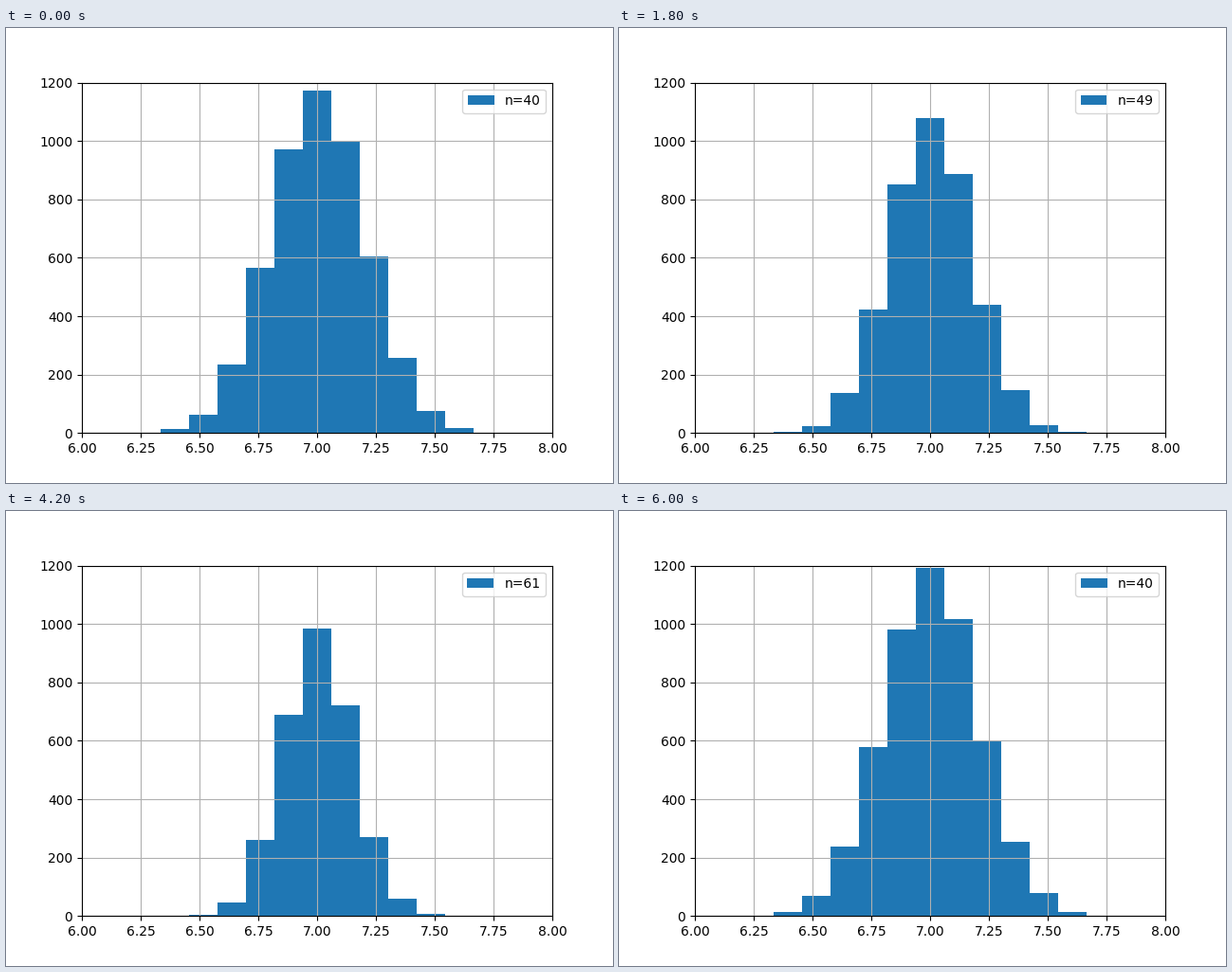
A matplotlib script that plays this animation: 640x480 px, repeating every 6.2 s.

```python
import math

import matplotlib.pyplot as plt
import numpy as np
from matplotlib.animation import FuncAnimation

FRAMES = 31
Y_MAX = 1200
MEAN = 7.004
EDGES = np.linspace(5, 9, 34)
CENTERS = (EDGES[:-1] + EDGES[1:]) / 2


def sample_size(step):
    return 40 + step % 30


def normal_cdf(z):
    return 0.5 * (1 + math.erf(z / math.sqrt(2)))


def bin_counts(step):
    """Histogram of sample means, drawn from a finite population."""
    n = sample_size(step)
    total = 213000 // n // 1000 * 1000
    sd = math.sqrt((2.27 - 0.0159 * n) / n)
    expected = total * np.diff([normal_cdf((x - MEAN) / sd) for x in EDGES])
    jitter = np.random.default_rng(step).normal(0, 0.3, expected.size)
    counts = np.round(expected + jitter * np.sqrt(expected))
    return np.clip(counts, 0, Y_MAX - 4)


fig, ax = plt.subplots(figsize=(6.4, 4.8), dpi=100)


def draw(step):
    ax.cla()
    ax.hist(CENTERS, bins=EDGES, weights=bin_counts(step),
            color="#1f77b4", label=f"n={sample_size(step)}")
    ax.set_xlim(6, 8)
    ax.set_ylim(0, Y_MAX)
    ax.grid(True)
    ax.legend(loc="upper right")
    return ax.patches


anim = FuncAnimation(fig, draw, frames=FRAMES, interval=200, repeat=True,
                     repeat_delay=0, blit=False)
plt.show()
```
